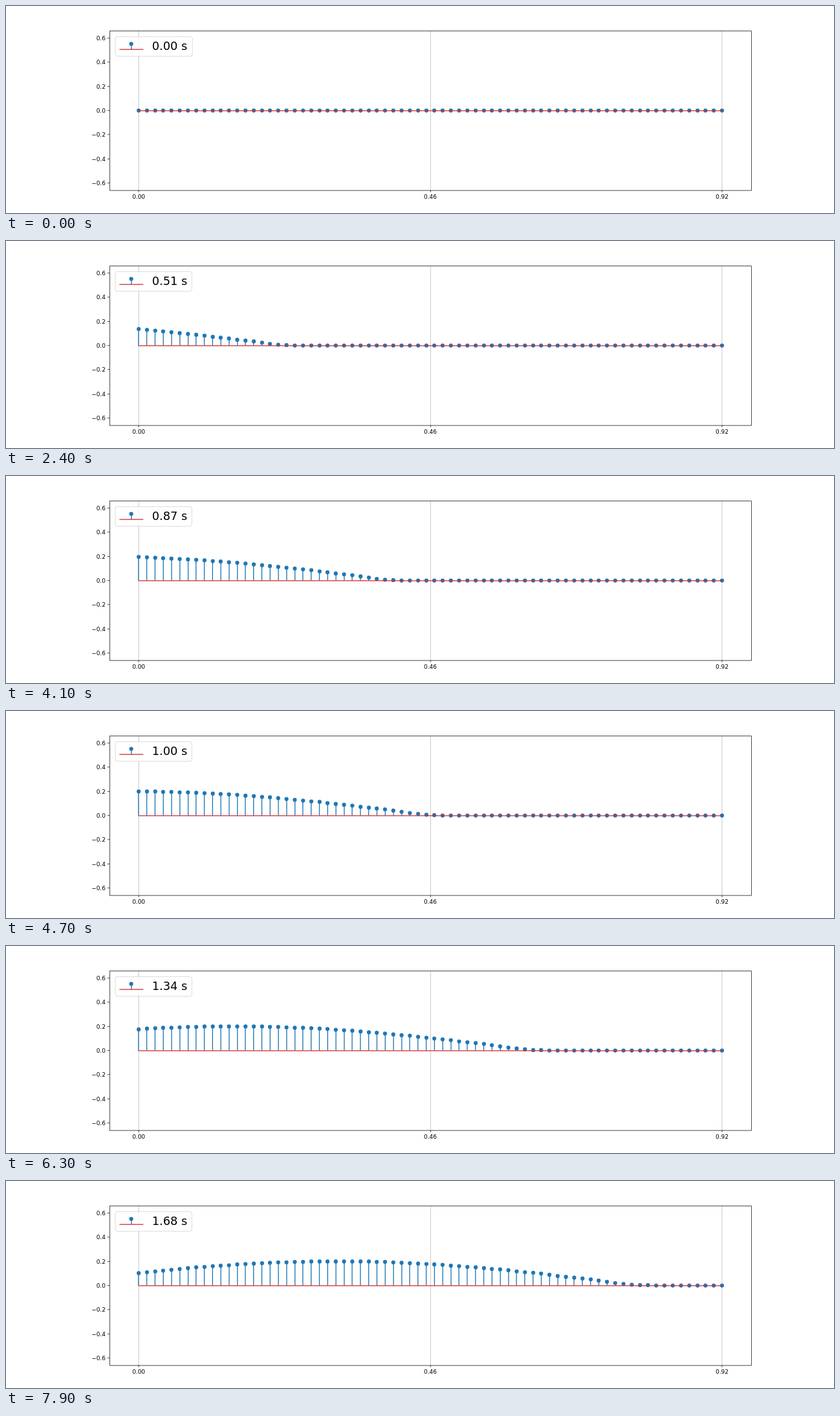
An HTML page with a canvas for the animation above (8 s loop, 1280x320 px).

```html
<!DOCTYPE html>
<html lang="en">
<head>
<meta charset="utf-8">
<title>Driven chain</title>
<style>
  html, body { margin: 0; width: 100%; height: 100%; overflow: hidden; background: #fff; }
  canvas { display: block; }
</style>
</head>
<body>
<canvas id="stage" width="1280" height="320"></canvas>
<script>
const ctx = document.getElementById('stage').getContext('2d');

const FRAMES = 80, FRAME_MS = 100, FPS = 47;
const NODES = 72, SUBSTEPS = 10, SPEED = 0.783, AMPLITUDE = 0.2;

// The plot is laid out on a 2000 x 500 sheet, shown at 0.64.
const SCALE = 0.64, PT = 100 / 72;
const LEFT = 250, RIGHT = 1800, TOP = 60, BOTTOM = 445;
const FIRST = 320.45, LAST = 1729.55, ZERO = 252.5, UNIT = 385 / 1.32;
const BLUE = '#1f77b4', RED = '#d62728';

const half = v => Math.floor(v) + 0.5;
const nodeX = i => FIRST + (LAST - FIRST) * i / (NODES - 1);
const valueY = v => ZERO - v * UNIT;

// Spring-coupled nodes; the one before the first is driven by a sine.
function simulate() {
  const u = new Float64Array(NODES + 2), velocity = new Float64Array(NODES + 2);
  const dt = 1 / SUBSTEPS, k = SPEED * SPEED;
  const history = [];
  for (let f = 0; f < FRAMES; f++) {
    history.push(u.slice(1, NODES + 1));
    for (let s = 1; s <= SUBSTEPS; s++) {
      for (let i = 1; i <= NODES; i++)
        velocity[i] += k * (u[i - 1] - 2 * u[i] + u[i + 1]) * dt;
      for (let i = 1; i <= NODES; i++) u[i] += velocity[i] * dt;
      u[0] = AMPLITUDE * Math.sin(Math.PI / 2 * (f + s * dt) / FPS);
    }
  }
  return history;
}

function line(x1, y1, x2, y2, color, points) {
  ctx.strokeStyle = color;
  ctx.lineWidth = points * PT;
  ctx.beginPath();
  ctx.moveTo(x1, y1);
  ctx.lineTo(x2, y2);
  ctx.stroke();
}

function dot(x, y) {
  ctx.fillStyle = BLUE;
  ctx.beginPath();
  ctx.arc(x, y, 3.5 * PT, 0, 2 * Math.PI);
  ctx.fill();
}

function label(text, x, y, points, align) {
  ctx.fillStyle = '#000';
  ctx.font = `${points * PT}px "DejaVu Sans", sans-serif`;
  ctx.textAlign = align;
  ctx.fillText(text, x, y);
}

const xTicks = [0, 0.46, 0.92].map(v => ({ text: v.toFixed(2), x: FIRST + (LAST - FIRST) * v / 0.92 }));

function drawStems(values) {
  values.forEach((v, i) => {
    const x = Math.round(nodeX(i));
    line(x, ZERO, x, valueY(v), BLUE, 1.5);
  });
  values.forEach((v, i) => dot(half(nodeX(i)), half(valueY(v))));
  line(FIRST - 1, 253, LAST + 1, 253, RED, 1.5);
}

function drawAxes() {
  for (const { text, x } of xTicks) {
    line(half(x), BOTTOM, half(x), BOTTOM + 3.5 * PT, '#000', 0.8);
    label(text, x, 465, 10, 'center');
  }
  for (let n = -3; n <= 3; n++) {
    const y = valueY(n / 5);
    line(LEFT - 3.5 * PT, half(y), LEFT, half(y), '#000', 0.8);
    label((n < 0 ? '\u2212' : '') + Math.abs(n / 5).toFixed(1), LEFT - 7 * PT, y + 5.3, 10, 'right');
  }
  ctx.strokeStyle = '#000';
  ctx.lineWidth = 0.8 * PT;
  ctx.strokeRect(half(LEFT), half(TOP), RIGHT - LEFT, BOTTOM - TOP);
}

function drawLegend(frame) {
  const x = 263.9, y = 73.9, right = frame ? 449 : 450.4;
  ctx.beginPath();
  ctx.roundRect(x, y, right - x, 47.6, 5.6);
  ctx.fillStyle = 'rgba(255,255,255,0.8)';
  ctx.fill();
  ctx.strokeStyle = 'rgba(204,204,204,0.8)';
  ctx.lineWidth = PT;
  ctx.stroke();
  line(303, 105, 303, 92, BLUE, 1.5);
  dot(302.5, 91.5);
  line(274, 105, 331.6, 105, RED, 1.5);
  label((frame / FPS).toFixed(2) + ' s', 352.8, 105.6, 20, 'left');
}

const history = simulate();

function draw(now) {
  const frame = Math.floor(now / FRAME_MS) % FRAMES;
  ctx.setTransform(SCALE, 0, 0, SCALE, 0, 0);
  ctx.fillStyle = '#fff';
  ctx.fillRect(0, 0, 2000, 500);
  for (const { x } of xTicks) line(half(x), TOP, half(x), BOTTOM, '#b0b0b0', 0.8);
  drawStems(history[frame]);
  drawAxes();
  drawLegend(frame);
}

const start = performance.now();
function tick() {
  draw(performance.now() - start);
  requestAnimationFrame(tick);
}
tick();
</script>
</body>
</html>
```
